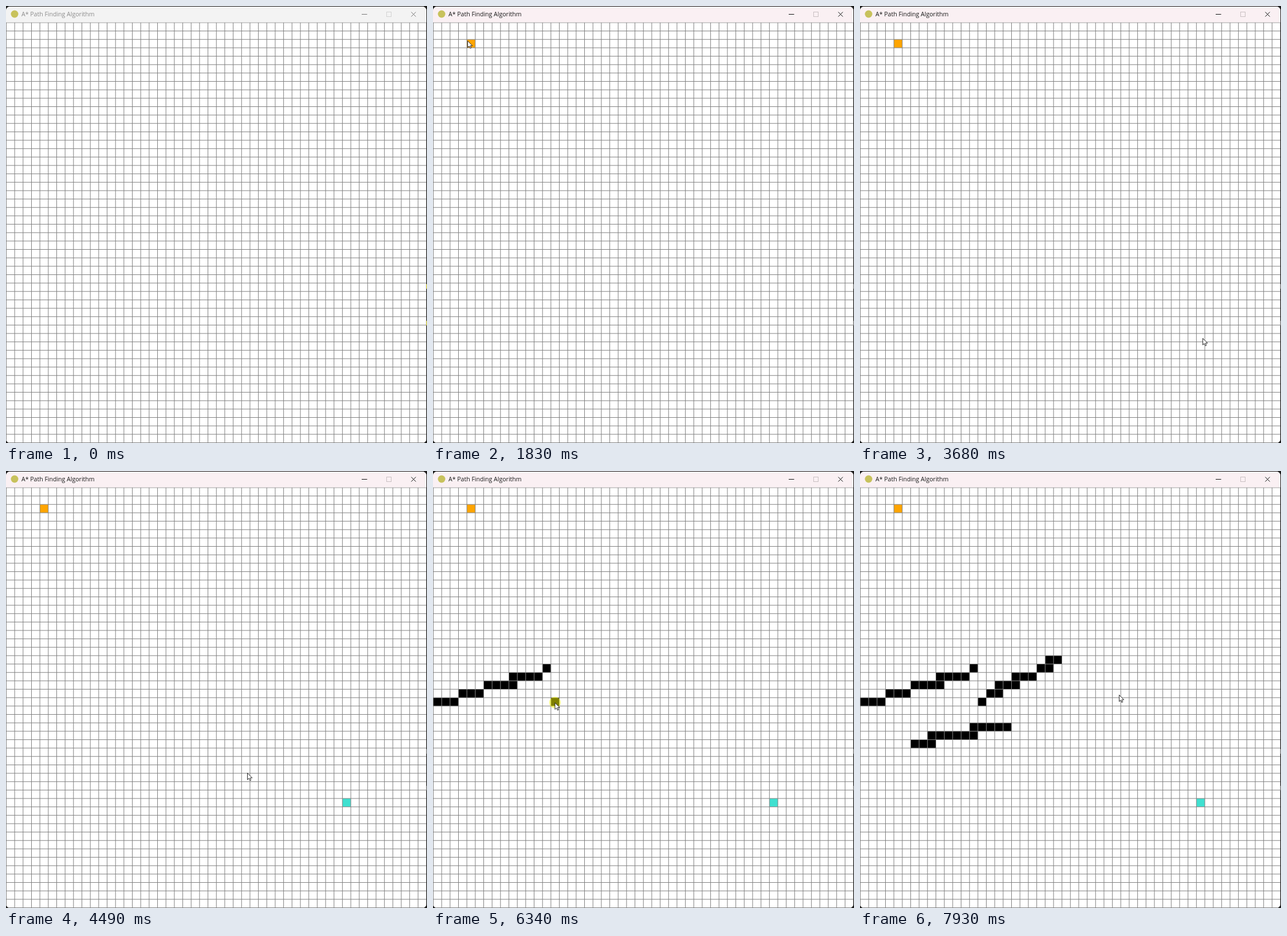
An HTML page with a canvas for the animation above (8 s loop, 735 by 762 pixels).

```html
<!DOCTYPE html>
<html lang="en">
<head>
<meta charset="utf-8">
<title>Path finding grid</title>
<style>
  html, body { margin: 0; width: 100%; height: 100%; overflow: hidden; background: #1b1b1b; }
  canvas { position: absolute; left: 0; top: 0; }
  #title {
    position: absolute; left: 27px; top: 5px; line-height: 19px; white-space: nowrap;
    font-family: "Open Sans", "Noto Sans", sans-serif; font-size: 10.55px;
  }
</style>
</head>
<body>
<canvas id="stage" width="735" height="762"></canvas>
<div id="title">A* Path Finding Algorithm</div>
<script>
const LOOP = 8000, ENTER = 190, POLL = 15;
const LEFT = 0.46, TOP = 28.97, COL = 14.672, ROW = 14.65, COUNT = 50;
const ctx = document.getElementById('stage').getContext('2d');
const title = document.getElementById('title');

// Pointer moves [from, to, x, y]; it rests in between
const moves = [
  [120, 960, 62.5, 68],
  [1760, 1900, 58.5, 53],
  [1900, 2580, 405.5, 459],
  [2580, 3480, 598.5, 579],
  [4300, 4770, 108.5, 433],
  [4770, 5050, 1, 406.6],
  [5310, 5730, 204, 347.4],
  [5870, 6270, 212.5, 404],
  [6340, 6410, 242, 380.8],
  [6410, 6620, 342, 332],
  [6760, 7640, 92, 475],
  [7653, 7860, 263.5, 441.3],
  [7860, 7930, 452.5, 390]
];

// Mouse presses [from, to]: the first sets the start, the second the end, later ones draw walls
const presses = [[1360, 1630], [4020, 4300], [5310, 5870], [6340, 6760], [7640, 7860]];
const paints = ['#ffa500', '#40e0d0', '#000'];

const isHeld = t => presses.some(([from, to]) => t >= from && t < to);

function pointerAt(t) {
  let x = 640, y = 740;
  for (const [from, to, toX, toY] of moves) {
    if (t < from) break;
    const u = Math.min(1, (t - from) / (to - from));
    const k = isHeld(from) ? u : u * u * (3 - 2 * u);
    x += (toX - x) * k;
    y += (toY - y) * k;
  }
  return { x, y };
}

function rect(color, x, y, w, h) {
  ctx.fillStyle = color;
  ctx.fillRect(x, y, w, h);
}

function disc(color, x, y, r) {
  ctx.fillStyle = color;
  ctx.beginPath();
  ctx.arc(x, y, r, 0, 7);
  ctx.fill();
}

function line(color, x1, y1, x2, y2) {
  ctx.strokeStyle = color;
  ctx.lineWidth = 1;
  ctx.beginPath();
  ctx.moveTo(x1, y1);
  ctx.lineTo(x2, y2);
  ctx.stroke();
}

// While the button is down, every poll fills the cell under the pointer
function drawCells(t) {
  const cells = new Map();
  presses.forEach(([from, to], i) => {
    for (let s = from; s <= t && s < to; s += POLL) {
      const { x, y } = pointerAt(s);
      const col = Math.floor((x - LEFT) / COL), row = Math.floor((y - TOP) / ROW);
      cells.set(col + ',' + row, [paints[Math.min(i, 2)], LEFT + col * COL, TOP + row * ROW, COL, ROW]);
    }
  });
  for (const box of cells.values()) rect(...box);
}

function drawGrid() {
  for (let i = 0; i <= COUNT; i++) {
    const x = LEFT + i * COL, y = TOP + i * ROW;
    line('#808080', x, TOP, x, 762);
    line('#808080', 0, y, 734, y);
  }
}

function drawTitleBar(active) {
  const ink = active ? '#111' : '#777';
  rect(active ? '#faf0f3' : '#f3f3f3', 0, 0, 734, 28.5);
  disc('#c8c25c', 15, 14, 6.5);
  line(ink, 621, 14.5, 630.5, 14.5);
  line(ink, 707.5, 10.5, 715.5, 18.5);
  line(ink, 715.5, 10.5, 707.5, 18.5);
  ctx.strokeStyle = active ? '#c9c0c2' : '#d2d2d2';
  ctx.strokeRect(664.5, 10.5, 8, 8);
  title.style.color = active ? '#191919' : '#8c8c8c';
}

function drawPointer(x, y) {
  ctx.save();
  ctx.translate(x, y);
  const arrow = new Path2D('M0 .5V12L2.7 9.6 4.5 13.5 6.3 12.7 4.6 8.9H8.3Z');
  ctx.fillStyle = '#fff';
  ctx.fill(arrow);
  ctx.strokeStyle = '#111';
  ctx.lineWidth = 0.9;
  ctx.stroke(arrow);
  ctx.restore();
}

function draw(t) {
  const active = t >= presses[0][0];
  const { x, y } = pointerAt(t);
  rect('#1b1b1b', 0, 0, 735, 762);
  for (const top of [485, 549]) rect(active ? '#777' : '#e6dc28', 734, top, 1, 8);

  ctx.save();
  ctx.beginPath();
  ctx.roundRect(0, 1, 734, 761, 7);
  ctx.clip();
  rect('#fff', 0, 0, 735, 762);
  drawCells(t);
  drawGrid();
  drawTitleBar(active);
  ctx.restore();

  if (isHeld(t)) disc('rgba(255, 255, 0, 0.5)', x, y, 10);
  if (t >= ENTER) drawPointer(x, y);
}

const begin = performance.now();
function tick() {
  draw((performance.now() - begin) % LOOP);
  requestAnimationFrame(tick);
}
tick();
</script>
</body>
</html>
```
